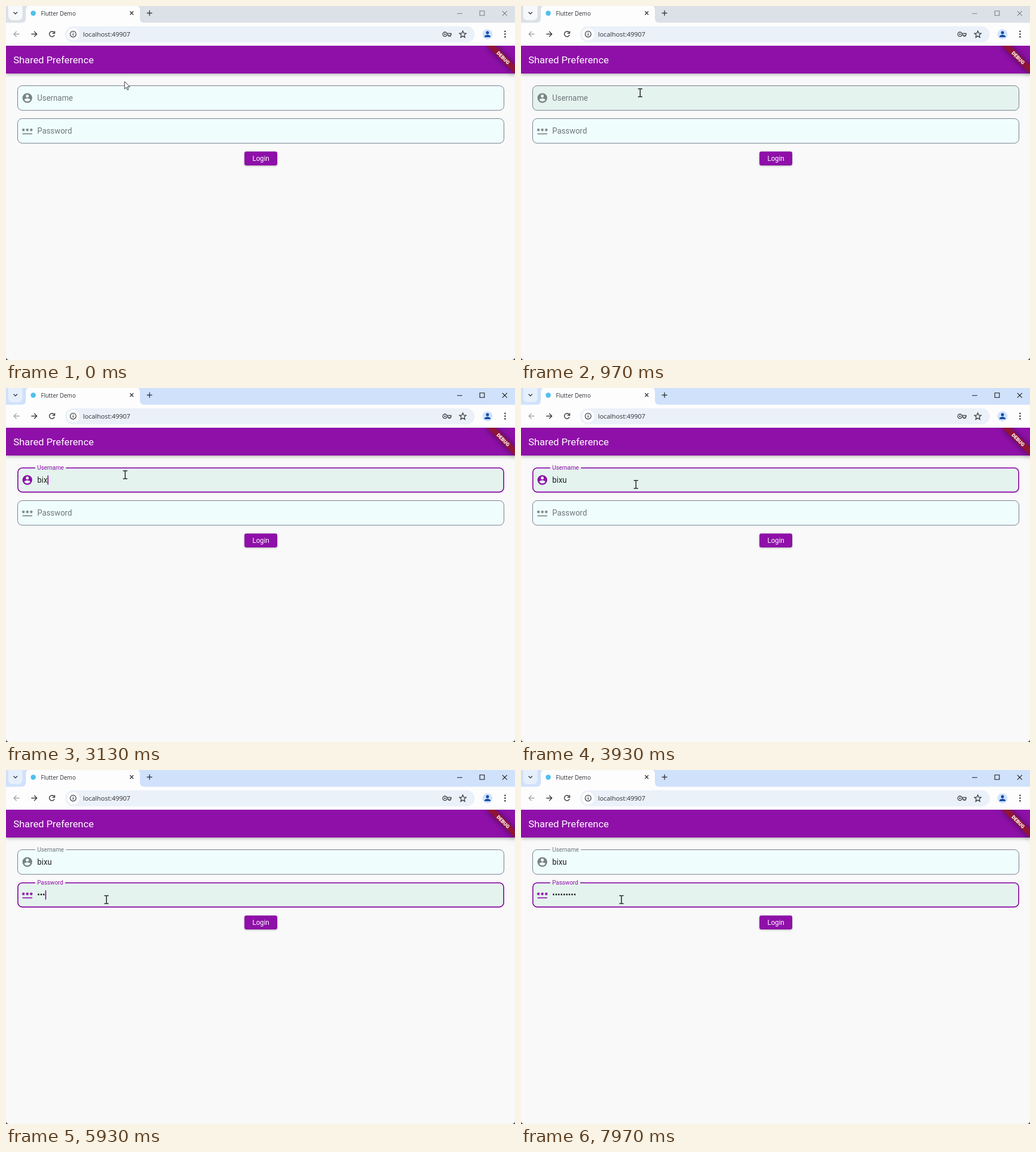
An HTML page for the animation above (8 s loop, 897 by 624 pixels).

```html
<!DOCTYPE html>
<html lang="en">
<head>
<meta charset="utf-8">
<title>Login form</title>
<style>
  html, body { margin: 0; width: 100%; height: 100%; overflow: hidden; background: #33363b; }
  svg { display: block; }
  #stage { width: 897px; height: 624px; border-radius: 0 0 5px 5px; background: #f9f9f9; }
  text { font-family: Roboto, sans-serif; white-space: pre; }
  .chrome { font-family: "Open Sans", sans-serif; fill: #2b2e32; }
  .line { fill: none; stroke: #33373b; stroke-width: 1.4; }
  .body { font-size: 13.86px; }
  .bar { fill: #8e10a8; filter: drop-shadow(0 1.5px 3px rgba(0, 0, 0, .35)); }
  .button { fill: #8e10a8; filter: drop-shadow(0 1.2px 1.5px rgba(0, 0, 0, .3)); }
  .ribbon { fill: #901435; filter: drop-shadow(0 0 6px rgba(0, 0, 0, .5)); }
</style>
</head>
<body>
<svg id="stage" viewBox="0 0 897 624">
  <!-- tab strip -->
  <rect id="strip" width="897" height="30"/>
  <rect id="tabSearch" x="4" y="-6" width="25" height="31" rx="7"/>
  <path class="line" d="M13.3 10.7l3.3 3.2 3.3-3.2"/>
  <path fill="#fdfdfe" d="M0 29.5H27Q35 29.5 35 22V7Q35 0 42 -1H229Q236 0 236 7V22Q236 29.5 244 29.5H897V70.5H0z"/>
  <circle cx="48" cy="12.7" r="4.5" fill="#4fc0ee"/>
  <text class="chrome" x="61.5" y="16.7" font-size="10">Flutter Demo</text>
  <path class="line" d="M218.5 9.3l6 6.2m0-6.2l-6 6.2M248.2 12.5h9.4m-4.7-4.7v9.4"/>
  <path id="windowButtons" fill="none" stroke-width="1.1" d="M795 13.2h9M835 8.8h8v8h-8zM874.7 8.8l8.3 8.4m0-8.4l-8.3 8.4"/>

  <!-- toolbar -->
  <g class="line">
    <path stroke="#a0a4a9" d="M23.8 49.5H14m4.6-4.7l-4.7 4.7 4.7 4.7"/>
    <path d="M44.5 49.5h9.8m-4.6-4.7l4.7 4.7-4.7 4.7"/>
    <path d="M84.8 46.7A4.6 4.6 0 1 0 85.4 51M85.8 44.3v3.9h-4"/>
  </g>
  <rect x="104" y="35.7" width="722" height="28.6" rx="14.3" fill="#ebf1f9"/>
  <circle cx="118.3" cy="49.8" r="10.8" fill="#fdfdfe"/>
  <circle cx="118.3" cy="49.6" r="5.2" class="line" style="stroke-width:1.2"/>
  <path class="line" d="M118.3 48.9v3.4m0-5.6v1.3"/>
  <text class="chrome" x="135.8" y="53.7" font-size="11.4">localhost:49907</text>
  <g class="line" style="stroke-width:1.3">
    <circle cx="773.5" cy="49.8" r="3.8"/>
    <path d="M777 48.4h7.4v2.8h-1.4v2.2h-2.8v-2.2H777"/>
    <circle cx="773.5" cy="49.8" r=".7"/>
    <path d="M805 44l1.7 3.9 4.2.4-3.2 2.8 1 4.2-3.7-2.2-3.7 2.2 1-4.2-3.2-2.8 4.2-.4z"/>
  </g>
  <circle cx="848.5" cy="49.8" r="9" fill="#d3e3fd"/>
  <circle cx="848.5" cy="47" r="2.7" fill="#174ea6"/>
  <path fill="#174ea6" d="M843.2 55v-1.3c0-2 3.4-3 5.3-3s5.3 1 5.3 3V55z"/>
  <g fill="#33373b">
    <circle cx="879.5" cy="44.8" r="1.4"/><circle cx="879.5" cy="49.6" r="1.4"/><circle cx="879.5" cy="54.4" r="1.4"/>
  </g>

  <!-- page -->
  <svg y="70" width="897" height="554">
    <rect class="bar" width="897" height="49"/>
    <text x="13" y="31" font-size="17.32" fill="#fff">Shared Preference</text>
    <g transform="translate(897 .5) rotate(45)">
      <rect class="ribbon" x="-34.6" y="24.2" width="69.2" height="10.4"/>
      <text y="32.5" font-size="8.8" font-weight="900" fill="#fff" text-anchor="middle">DEBUG</text>
    </g>
  </svg>
  <g id="fields"></g>
  <rect class="button" x="420.2" y="256.5" width="57.8" height="24.4" rx="3.4"/>
  <text x="449.1" y="273.2" font-size="12.12" fill="#fff" text-anchor="middle">Login</text>

  <path id="arrow" d="M0 0V13.2L3 10.4 5 15 7 14.1 5 9.6H9.2z" fill="#fff" stroke="#222" stroke-width=".9"/>
  <path id="beam" d="M-3.8-7H-1L0-6.4 1-7H3.8M0-6.4V6.4M-3.8 7H-1L0 6.4 1 7H3.8" fill="none" stroke="#1c1f20" stroke-width="1.5"/>
</svg>
<script>
const LOOP = 8000, FADE = 167, BLINK = 500;
const LEFT = 20, RIGHT = 878, HEIGHT = 44.4, RADIUS = 8.66, TEXT_X = 55;
const PURPLE = [142, 16, 168], GREY = [110, 118, 121], OUTLINE = [108, 112, 130];
const byId = id => document.getElementById(id);
const clamp = v => Math.min(1, Math.max(0, v));
const mix = (a, b, p) => a + (b - a) * p;
const rgb = c => `rgb(${c.map(Math.round)})`;
const blend = (a, b, p) => rgb(a.map((v, i) => mix(v, b[i], p)));
const show = (el, on) => el.setAttribute('visibility', on ? 'visible' : 'hidden');
const set = (el, attrs) => Object.entries(attrs).forEach(([k, v]) => el.setAttribute(k, v));

// cubic-bezier(.4, 0, .2, 1), solved by bisection
function ease(x) {
  x = clamp(x);
  let lo = 0, hi = 1, s = .5;
  for (let i = 0; i < 20; i++) {
    s = (lo + hi) / 2;
    const bx = 1.2 * s * (1 - s) ** 2 + .6 * s * s * (1 - s) + s ** 3;
    if (bx < x) lo = s; else hi = s;
  }
  return 3 * s * s * (1 - s) + s ** 3;
}

const userIcon = '<path fill-rule="evenodd" d="M12 2a10 10 0 1 0 0 20a10 10 0 1 0 0-20zm0 3a3 3 0 1 1 0 6a3 3 0 1 1 0-6zm0 14.2c-2.5 0-4.7-1.3-6-3.2 0-2 4-3.1 6-3.1s6 1.1 6 3.1c-1.3 1.9-3.5 3.2-6 3.2z"/>';
const passwordIcon = '<path d="M2 17h20v2H2z"/>' + [4, 12, 20].map(x =>
  `<path transform="translate(${x} 10)" stroke="currentColor" stroke-width="1.5" d="M-3 0H3M-1.5-2.6L1.5 2.6M1.5-2.6L-1.5 2.6"/>`).join('');

const fields = [
  { label: 'Username', hint: 'Write username here...', value: 'bixu', icon: userIcon,
    top: 140, focus: 1285, blur: 4766, typeStart: 2550, typeStep: 250 },
  { label: 'Password', hint: 'Write password here...', value: '•'.repeat(9), icon: passwordIcon,
    top: 198, focus: 4766, blur: Infinity, typeStart: 5390, typeStep: 255 },
].map(createField);

function createField(f) {
  const group = document.createElementNS('http://www.w3.org/2000/svg', 'g');
  const baseline = f.top + 27.1;
  group.innerHTML = `
    <rect x="${LEFT}" y="${f.top}" width="${RIGHT - LEFT}" height="${HEIGHT}" rx="${RADIUS}"/>
    <path fill="none"/>
    <g transform="translate(27.2 ${f.top + 11.7}) scale(.866)" fill="currentColor">${f.icon}</g>
    <text class="body" x="${TEXT_X}" y="${baseline}" fill="#737a7c">${f.hint}</text>
    <text class="body" x="${TEXT_X}" y="${baseline}" fill="#1e2222"></text>
    <text class="body">${f.label}</text>
    <rect y="${f.top + 14.2}" width="1.7" height="16.2" fill="${rgb(PURPLE)}"/>`;
  byId('fields').append(group);
  const [fill, border, icon, hint, text, label, caret] = group.children;
  return { ...f, fill, border, icon, hint, text, label, caret };
}

// Rounded outline drawn inside the field's edge, open between gapStart and gapEnd
function outline(top, lineWidth, gapStart, gapEnd) {
  const inset = lineWidth / 2, r = RADIUS - inset;
  const [x1, x2, y1, y2] = [LEFT + inset, RIGHT - inset, top + inset, top + HEIGHT - inset];
  const arc = (x, y) => `A${r} ${r} 0 0 1 ${x} ${y}`;
  return `M${gapEnd} ${y1}H${x2 - r}${arc(x2, y1 + r)}V${y2 - r}${arc(x2 - r, y2)}` +
    `H${x1 + r}${arc(x1, y2 - r)}V${y1 + r}${arc(x1 + r, y1)}H${gapStart}`;
}

const isOver = (f, y) => y >= f.top && y <= f.top + HEIGHT;

function drawField(f, t, mouseY) {
  const focused = t >= f.focus && t < f.blur;
  const float = ease((t - f.focus) / FADE);
  const active = float * (1 - ease((t - f.blur) / FADE));
  f.fill.setAttribute('fill', isOver(f, mouseY) ? '#e5f3ee' : '#f0fdfd');

  const gapStart = 51.5;
  const gapEnd = gapStart + (f.label.getComputedTextLength() * .75 + 7) * float;
  const lineWidth = mix(.95, 1.8, active);
  set(f.border, {
    d: outline(f.top, lineWidth, gapStart, gapEnd),
    stroke: blend(OUTLINE, PURPLE, active),
    'stroke-width': lineWidth,
  });
  f.icon.style.color = rgb(focused ? PURPLE : [123, 131, 133]);
  set(f.label, {
    transform: `translate(${TEXT_X} ${f.top + mix(26.9, 4, float)}) scale(${mix(1, .75, float)})`,
    fill: blend(GREY, PURPLE, active),
  });

  const typed = Math.min(f.value.length, Math.max(0, Math.floor((t - f.typeStart) / f.typeStep) + 1));
  const value = f.value.slice(0, typed);
  if (f.text.textContent !== value) f.text.textContent = value;
  show(f.hint, focused && t > f.focus + 20 && !typed);

  // Every key press restarts the blink
  const lastInput = typed ? f.typeStart + (typed - 1) * f.typeStep : f.focus;
  f.caret.setAttribute('x', TEXT_X + (typed ? f.text.getComputedTextLength() : 0));
  show(f.caret, focused && Math.floor((t - lastInput) / BLINK) % 2 === 0);
}

const mousePath = [[150, 209, 133], [600, 210, 153], [3700, 210, 153], [4450, 177, 228.5]];

function mouseAt(t) {
  const next = mousePath.findIndex(p => p[0] > t);
  if (next === 0) return mousePath[0].slice(1);
  if (next < 0) return mousePath.at(-1).slice(1);
  const [a, b] = [mousePath[next - 1], mousePath[next]];
  const p = (t - a[0]) / (b[0] - a[0]);
  const s = p * p * (3 - 2 * p);
  return [mix(a[1], b[1], s), mix(a[2], b[2], s)];
}

function draw() {
  const t = performance.now() % LOOP;
  const windowActive = t >= fields[0].focus;
  byId('strip').setAttribute('fill', windowActive ? '#d0e1fb' : '#dce1e7');
  byId('tabSearch').setAttribute('fill', windowActive ? '#e6effc' : '#f7f8fa');
  byId('windowButtons').setAttribute('stroke', windowActive ? '#111' : '#777b80');

  const [x, y] = mouseAt(t);
  fields.forEach(f => drawField(f, t, y));
  const overField = fields.some(f => isOver(f, y));
  for (const id of ['arrow', 'beam']) {
    byId(id).setAttribute('transform', `translate(${x} ${y})`);
    show(byId(id), (id === 'beam') === overField);
  }
  requestAnimationFrame(draw);
}
draw();
</script>
</body>
</html>
```
